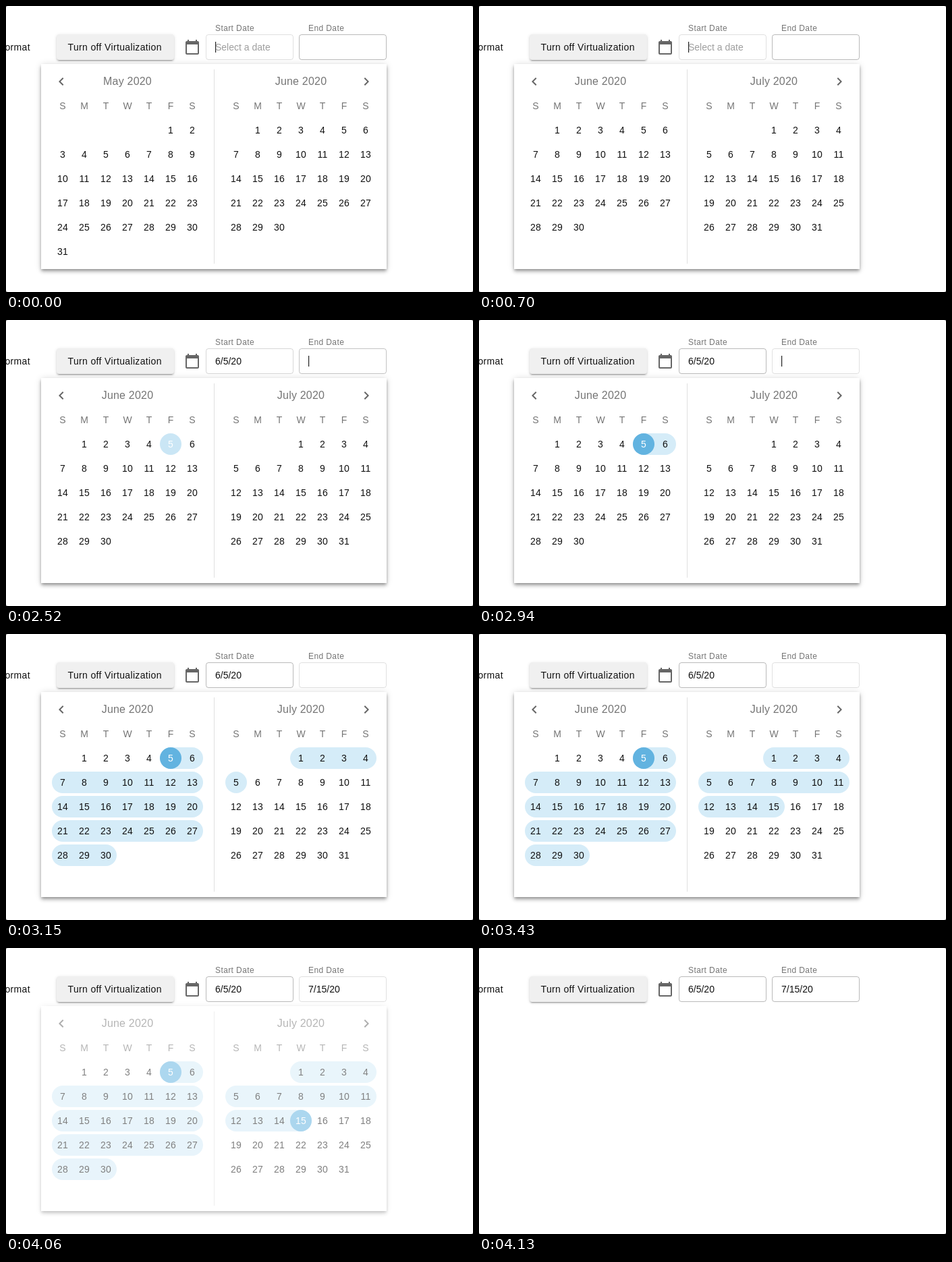
Animation of 692x424 px, one loop 4830 ms. Source, as an HTML page:

```html
<!DOCTYPE html>
<html lang="en">
<head>
<meta charset="utf-8">
<title>Date range picker</title>
<style>
  html, body { margin: 0; width: 100%; height: 100%; overflow: hidden; background: #777; }
  .stage { position: absolute; left: 0; top: 0; width: 692px; height: 424px; overflow: hidden; background: #fff; border-radius: 3px; }
  .stage > * { position: absolute; }
  svg { display: block; }
  text { font: 14px "Liberation Sans", Arial, sans-serif; fill: #111; }
  .button {
    left: 75px; top: 42px; width: 174px; height: 38px; border-radius: 4px; background: #f0f0f0;
    box-shadow: 0 3px 1px -2px rgba(0,0,0,.2), 0 2px 2px rgba(0,0,0,.14), 0 1px 5px rgba(0,0,0,.12);
  }
  .panel {
    left: 52px; top: 86px; width: 512px; height: 304px; background: #fff;
    box-shadow: 0 2px 4px -1px rgba(0,0,0,.3), 0 4px 5px rgba(0,0,0,.2), 0 1px 10px rgba(0,0,0,.14);
  }
  .form { left: 0; top: 0; }
  .spaced { letter-spacing: .35px; }
  .label { font-size: 12px; letter-spacing: .4px; fill: #757575; }
  .hint { fill: #9e9e9e; }
  .title { font-size: 16px; letter-spacing: .2px; fill: #757575; }
  .weekday { fill: #757575; }
  .day { letter-spacing: .2px; }
  .mid { text-anchor: middle; }
  .icon { fill: #666; }
  .field { fill: none; stroke: #000; }
  .caret { fill: #222; }
  .pill { fill: #d5ecf8; }
  .dot { fill: #62b3e0; }
  .divider { fill: #e0e0e0; }
</style>
</head>
<body>
<div class="stage">
  <div class="button"></div>
  <svg class="form" id="form" width="692" height="424"></svg>
  <div class="panel" id="panel">
    <svg id="calendar" width="512" height="304" viewBox="52 86 512 304"></svg>
  </div>
</div>
<script>
const LOOP = 4830, STEP = 70;
const CELL = 32, ROW = 36, PAGE = 257;
const FIRST_X = 84, FIRST_Y = 184;
const JUNE_DAYS = 30, START_DAY = 5, END_DAY = 15;

// Each table is [time, value], holding until the next entry.
const SCROLL = [[0, 0], [280, 139], [420, PAGE]];
const START_CARET = [[0, 1], [420, 0], [700, 1], [1260, 0], [1750, 1], [2310, 0]];
const END_CARET = [[0, 0], [2520, 1], [3080, 0], [3640, 1], [3780, 0]];
// Last day of the range, counted from 1 June.
const RANGE = [[0, 0], [2940, 6], [3080, 13], [3150, 35], [3220, 36], [3290, 43], [3360, 44], [3430, 45]];
const FADE = [[0, 1], [3990, .85], [4060, .53], [4130, 0]];

const at = (table, t) => table.filter(([time]) => time <= t).pop()[1];
const ramp = (t, from, to) => Math.min(1, Math.max(0, (t - from) / (to - from)));
const byId = id => document.getElementById(id);

function add(parent, tag, attrs = {}, content = "") {
  const node = document.createElementNS("http://www.w3.org/2000/svg", tag);
  for (const name in attrs) node.setAttribute(name, attrs[name]);
  node.textContent = content;
  parent.appendChild(node);
  return node;
}
const write = (parent, x, y, content, cls = "") => add(parent, "text", { x, y, class: cls }, content);
const show = (node, on) => node.setAttribute("opacity", Number(on));

// Toolbar and inputs
const form = byId("form");
write(form, 36, 66, "Format", "spaced").setAttribute("text-anchor", "end");
write(form, 91.5, 66, "Turn off Virtualization", "spaced");
add(form, "path", {
  class: "icon", transform: "translate(264 49)",
  d: "M20 3h-1V1h-2v2H7V1H5v2H4c-1.1 0-2 .9-2 2v16c0 1.1.9 2 2 2h16c1.1 0 2-.9 2-2V5c0-1.1-.9-2-2-2zm0 18H4V8h16v13z"
});

function makeField(x, textX, label, date) {
  write(form, textX, 37, label, "label");
  return {
    box: add(form, "rect", { x, y: 42.5, width: 129, height: 37, rx: 3.5, class: "field" }),
    value: write(form, textX, 66, date),
    caret: add(form, "rect", { x: textX, y: 53, width: 1.2, height: 16, class: "caret" })
  };
}
const start = makeField(296.5, 310, "Start Date", "6/5/20");
const end = makeField(434.5, 448, "End Date", "7/15/20");
const hint = write(form, 310, 66, "Select a date", "hint");

// Calendar
const calendar = byId("calendar");
const track = add(calendar, "g");

function makeMonth(index) {
  const date = new Date(2020, 4 + index, 1);
  const offset = date.getDay();
  const count = new Date(2020, 5 + index, 0).getDate();
  const group = add(track, "g", { transform: `translate(${index * PAGE} 0)` });
  const place = day => {
    const slot = offset + day - 1;
    return { x: FIRST_X + slot % 7 * CELL, y: FIRST_Y + Math.floor(slot / 7) * ROW };
  };
  add(group, "rect", { x: 308, y: 94, width: 1, height: 288, class: "divider" });
  write(group, 180, 117, ["May", "June", "July"][index] + " 2020", "title mid");
  [..."SMTWTFS"].forEach((c, i) => write(group, FIRST_X + i * CELL, 153, c, "weekday mid"));
  const pills = add(group, "g"), dots = add(group, "g"), days = [];
  for (let day = 1; day <= count; day++) {
    const { x, y } = place(day);
    days[day] = write(group, x, y + 5, day, "day mid");
  }
  return {
    highlight(from, to) {
      pills.textContent = "";
      for (let day = from; day <= to;) {
        const { x, y } = place(day);
        const length = Math.min(7 - (offset + day - 1) % 7, to - day + 1);
        add(pills, "rect", { x: x - 16, y: y - 16, width: length * CELL, height: CELL, rx: 16, class: "pill" });
        day += length;
      }
    },
    makeDot(day) {
      const { x, y } = place(day);
      const dot = add(dots, "circle", { cx: x, cy: y, r: 16, class: "dot" });
      return amount => {
        show(dot, amount);
        days[day].style.fill = amount > .3 ? "#fff" : "";
      };
    }
  };
}
const [, june, july] = [0, 1, 2].map(makeMonth);
const pickStart = june.makeDot(START_DAY);
const pickEnd = july.makeDot(END_DAY);

add(calendar, "path", { class: "icon", transform: "translate(70 100)", d: "M15.41 7.41L14 6l-6 6 6 6 1.41-1.41L10.83 12z" });
add(calendar, "path", { class: "icon", transform: "translate(522 100)", d: "M8.59 16.59L13.17 12 8.59 7.41 10 6l6 6-6 6z" });

let lastRange = -1;
function setRange(last) {
  if (last === lastRange) return;
  lastRange = last;
  june.highlight(START_DAY, Math.min(last, JUNE_DAYS));
  july.highlight(1, last - JUNE_DAYS);
}

const setBorder = (field, amount) => field.box.setAttribute("stroke-opacity", .12 + .15 * amount);

function draw(t) {
  const hasStart = t >= 2520, hasEnd = t >= 3780, closed = t >= 4130;
  const focusMove = ramp(t, 2450, 2730);

  track.setAttribute("transform", `translate(${-at(SCROLL, t)} 0)`);
  setRange(at(RANGE, t));
  pickStart(ramp(t, 2450, 2660));
  pickEnd(ramp(t, 3710, 3920));
  byId("panel").style.opacity = at(FADE, t);

  show(hint, !hasStart);
  show(start.value, hasStart);
  show(end.value, hasEnd);
  show(start.caret, at(START_CARET, t));
  show(end.caret, at(END_CARET, t));
  setBorder(start, focusMove);
  setBorder(end, closed ? 1 : 1 - focusMove);
}

const origin = performance.now();
function tick() {
  const t = (performance.now() - origin) % LOOP;
  draw(Math.floor(t / STEP) * STEP);
  requestAnimationFrame(tick);
}
tick();
</script>
</body>
</html>
```
